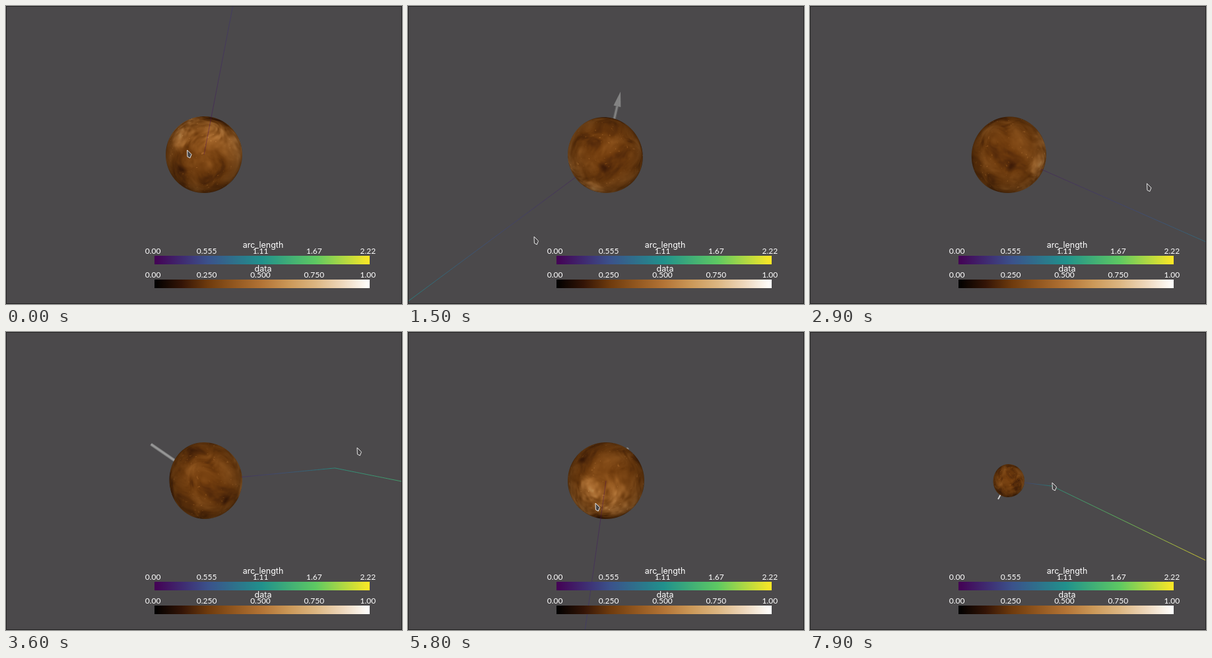
An HTML page with a canvas for the animation above (8000 ms loop, 600x451 px).

```html
<!DOCTYPE html>
<html lang="en">
<head>
<meta charset="utf-8">
<title>Rotating planet</title>
<style>
  html, body { margin: 0; width: 100%; height: 100%; overflow: hidden; background: #4b494b; }
  canvas, svg { position: absolute; left: 0; top: 0; display: block; }
  text { fill: #fff; text-anchor: middle; font: 12px Lato, "Open Sans", sans-serif; }
  .title { font: 12.5px Inter, Roboto, sans-serif; }
</style>
</head>
<body>
<canvas id="scene" width="600" height="451"></canvas>
<svg id="overlay" width="600" height="451" viewBox="0 0 600 451">
  <defs></defs>
  <g id="bars"></g>
  <rect x=".5" y=".5" width="599" height="450" fill="none" stroke="#222122"/>
  <path id="cursor" d="M0 0L6.5 6.5L4.3 12L.4 10Z" fill="#474547" stroke="#e8e8e8"/>
</svg>
<script>
const LOOP = 8000, STEP = 100, CX = 300, CY = 225;
const FOCAL = 841, NEAR = 14.5, FAR = 33.6;
const KINK_DISTANCE = 12, KINK_ARC = 1.2, TOTAL_ARC = 2.22;

// Drag stops: time, pointer x and y, line heading and tilt toward the viewer in degrees
const stops = [
  [0, 274.5, 218, -79, 14],
  [1500, 191, 349, -216.5, -33],
  [2200, 417, 350, -307, 0],
  [3600, 532, 175, -365.5, -60.5],
  [4500, 317, 79, -432, 0],
  [5800, 284, 259, -622, 14],
  [6300, 410, 300, -662, 5],
  [7900, 367, 228, -353, -72.5]
];
// Arrow parts that swing past the limb, with their reach in planet radii
const shafts = [
  { time: 1500, angle: -77, reach: 1.69, pointed: true },
  { time: 3600, angle: 214.5, reach: 1.68 },
  { time: 4500, angle: 46.5, reach: 1.38, pointed: true },
  { time: 5800, angle: -56, reach: 1.03 },
  { time: 7900, angle: 118, reach: 1.27 }
];
const viridis = ["#440154", "#3b528b", "#21918c", "#5ec962", "#fde725"];
const copper = ["#000000", "#331406", "#6f3b0d", "#935820", "#b37436", "#cb9858", "#dcb682", "#eed8bd", "#ffffff"];

const clamp = (x, lo = 0, hi = 1) => Math.min(hi, Math.max(lo, x));
const mix = (a, b, t) => a + (b - a) * t;
const mixAll = (a, b, t) => a.map((v, i) => mix(v, b[i], t));
const ease = t => t * t * (3 - 2 * t);
const radians = degrees => degrees * Math.PI / 180;
const dot = (a, b) => a[0] * b[0] + a[1] * b[1] + a[2] * b[2];
const cross = (a, b) => [
  a[1] * b[2] - a[2] * b[1], a[2] * b[0] - a[0] * b[2], a[0] * b[1] - a[1] * b[0]
];

// Smooth curve through the drag stops
function dragAt(time) {
  const i = Math.max(0, stops.findLastIndex((s, n) => s[0] <= time && n < stops.length - 1));
  const a = stops[i], b = stops[i + 1];
  const before = stops[Math.max(0, i - 1)], after = stops[Math.min(stops.length - 1, i + 2)];
  const span = b[0] - a[0], t = Math.min(1, (time - a[0]) / span);
  const [x, y, heading, tilt] = [1, 2, 3, 4].map(c => {
    if (c > 2) return mix(a[c], b[c], t);
    const m0 = (b[c] - before[c]) / (b[0] - before[0]) * span;
    const m1 = (after[c] - a[c]) / (after[0] - a[0]) * span;
    return mix(a[c], b[c], ease(t)) + t * (1 - t) * (m0 * (1 - t) - m1 * t);
  });
  return { x, y, heading: radians(heading), tilt: radians(tilt) };
}

function lineDirection({ heading, tilt }) {
  return [Math.cos(heading) * Math.cos(tilt), Math.sin(heading) * Math.cos(tilt), Math.sin(tilt)];
}

// The planet turns with the line: carry its frame along without extra roll.
const poses = [];
let side = [.2, .1, 1];
for (let time = 0; time < LOOP; time += STEP) {
  const axis = lineDirection(dragAt(time)), lean = dot(side, axis);
  side = side.map((v, i) => v - axis[i] * lean);
  const length = Math.hypot(...side);
  side = side.map(v => v / length);
  poses.push([side, cross(axis, side), axis]);
}

const parseRamp = ramp => ramp.map(hex => [1, 3, 5].map(i => parseInt(hex.slice(i, i + 2), 16)));
const viridisRgb = parseRamp(viridis), copperRgb = parseRamp(copper);

function rampColor(ramp, value) {
  const x = clamp(value) * (ramp.length - 1), i = Math.min(ramp.length - 2, Math.floor(x));
  return mixAll(ramp[i], ramp[i + 1], x - i);
}

// Smooth value noise
function hash(x, y, z) {
  let h = Math.imul(x, 374761393) ^ Math.imul(y, 668265263) ^ Math.imul(z, 1442695041);
  h = Math.imul(h ^ (h >>> 13), 1274126177);
  return ((h ^ (h >>> 16)) >>> 0) / 4294967295;
}
function noise(x, y, z) {
  const i = Math.floor(x), j = Math.floor(y), k = Math.floor(z);
  const u = ease(x - i), v = ease(y - j), w = ease(z - k);
  const row = (b, c) => mix(hash(i, b, c), hash(i + 1, b, c), u);
  const plane = c => mix(row(j, c), row(j + 1, c), v);
  return mix(plane(k), plane(k + 1), w);
}
function fbm(x, y, z) {
  let sum = 0, amp = .53;
  for (let octave = 0; octave < 4; octave++, amp /= 2) {
    sum += amp * noise(x, y, z);
    x = x * 2.03 + 5; y = y * 2.03 + 9; z = z * 2.03 + 2;
  }
  return sum;
}
// Brighter, mottled terrain lies on the side the line leaves from.
function surface(x, y, z) {
  const bend = noise(x * 2 + 7, y * 2, z * 2) * 1.5;
  const streaks = fbm(x * 2.4 + bend, y * 2.4 + bend, z * 1.7);
  const bright = ease(clamp((z + .35) / 1.1)) * clamp(noise(x * 2 + 20, y * 2, z * 2) * 2 - .2);
  const grain = noise(x * 10, y * 10 + bend * 4, z * 6);
  const speck = Math.max(0, noise(x * 15 + 40, y * 15, z * 15) - .86);
  return .26 + (streaks - .5) * .36 + bright * (.06 + grain * .2) + speck;
}

const ctx = document.getElementById("scene").getContext("2d");
const SIZE = 124, HALF = SIZE / 2;
const ball = document.createElement("canvas");
ball.width = ball.height = SIZE;
const ballCtx = ball.getContext("2d");

function drawPlanet(axes, radius) {
  const image = ballCtx.createImageData(SIZE, SIZE);
  // The far side flattens as the line points away from the viewer.
  const [lx, ly, lz] = axes[2], lateral = Math.hypot(lx, ly) || 1;
  const squash = Math.max(0, -lz) * .11, ux = -lx / lateral, uy = -ly / lateral;
  for (let row = 0; row < SIZE; row++) for (let col = 0; col < SIZE; col++) {
    let x = (col + .5 - HALF) / radius, y = (row + .5 - HALF) / radius;
    const extra = Math.max(0, x * ux + y * uy) * squash / (1 - squash);
    x += ux * extra;
    y += uy * extra;
    const r = Math.hypot(x, y), alpha = clamp((1 - r) * radius + .5);
    if (!alpha) continue;
    const normal = [x, y, Math.sqrt(Math.max(0, 1 - r * r))];
    const rgb = rampColor(copperRgb, surface(...axes.map(a => dot(a, normal))));
    const shade = .6 + .42 * normal[2] - .05 * y;
    const at = (row * SIZE + col) * 4;
    for (let c = 0; c < 3; c++) image.data[at + c] = rgb[c] * shade;
    image.data[at + 3] = alpha * 255;
  }
  ballCtx.putImageData(image, 0, 0);
  ctx.drawImage(ball, CX - HALF, CY - HALF);
}

function stroke(from, to, width, color) {
  ctx.strokeStyle = color;
  ctx.lineWidth = width;
  ctx.beginPath();
  ctx.moveTo(CX + from[0], CY + from[1]);
  ctx.lineTo(CX + to[0], CY + to[1]);
  ctx.stroke();
}

const gray = value => `rgb(${value},${value},${value})`;

function drawShaft({ time, angle, reach, pointed }, now, radius) {
  const away = (now - time) / 650;
  const length = radius * (1 + (reach - 1) * (1 - away * away));
  if (length <= radius) return;
  const turned = radians(angle - away * 25), dx = Math.cos(turned), dy = Math.sin(turned);
  const light = Math.round(180 + 50 * dy), width = 4.6 * radius / 58;
  const head = pointed ? (length - radius) * .57 : 0, neck = length - head;
  const end = [dx * neck, dy * neck];
  stroke([0, 0], end, width, gray(light - 30));
  stroke([0, 0], end, width / 2, gray(light));
  if (!pointed) return;
  const half = head * .2 + 1;
  ctx.beginPath();
  ctx.moveTo(CX + dx * length, CY + dy * length);
  ctx.lineTo(CX + end[0] - dy * half, CY + end[1] + dx * half);
  ctx.lineTo(CX + end[0] + dy * half, CY + end[1] - dx * half);
  ctx.fillStyle = gray(light);
  ctx.fill();
}

function project([x, y, z], distance) {
  const scale = FOCAL / Math.max(.5, distance - z);
  return [x * scale, y * scale];
}

function drawArc(drag, distance, radius) {
  const start = [0, 0, clamp(drag.tilt / radians(14), -1, 1)];
  const bend = lineDirection(drag).map(v => v * KINK_DISTANCE);
  const onward = drag.heading + radians(20);
  const end = [bend[0] + 11 * Math.cos(onward), bend[1] + 11 * Math.sin(onward), bend[2] + 9];
  const legs = [[start, bend, 0, KINK_ARC], [bend, end, KINK_ARC, TOTAL_ARC]];
  const pieces = 120;
  for (const [a, b, arcA, arcB] of legs) for (let i = 0; i < pieces; i++) {
    const far = mixAll(a, b, (i + 1) / pieces);
    const from = project(mixAll(a, b, i / pieces), distance), to = project(far, distance);
    const r = Math.hypot(...to) / radius;
    if (r < 1 && far[2] < Math.sqrt(1 - r * r)) continue;
    const arc = mix(arcA, arcB, (i + .5) / pieces);
    ctx.globalAlpha = clamp(.45 + arc * .4, 0, .9);
    stroke(from, to, .9, `rgb(${rampColor(viridisRgb, arc / TOTAL_ARC).map(Math.round)})`);
  }
  ctx.globalAlpha = 1;
}

function buildBar(name, id, y, ramp, labels) {
  const colors = ramp.map((c, i) => `<stop offset="${i / (ramp.length - 1)}" stop-color="${c}"/>`).join("");
  document.querySelector("defs").innerHTML += `<linearGradient id="${id}">${colors}</linearGradient>`;
  const ticks = labels.map((s, i) => `<text x="${222.7 + i * 81.4}" y="${y - 3}">${s}</text>`).join("");
  document.getElementById("bars").innerHTML +=
    `<rect x="225" y="${y}" width="326" height="13" fill="url(#${id})"/>` +
    `<text class="title" x="389.5" y="${y - 12.5}">${name}</text>${ticks}`;
}
buildBar("arc_length", "arcRamp", 378, viridis, ["0.00", "0.555", "1.11", "1.67", "2.22"]);
buildBar("data", "dataRamp", 414, copper, ["0.00", "0.250", "0.500", "0.750", "1.00"]);

const cursor = document.getElementById("cursor");

function render(time) {
  const drag = dragAt(time);
  const distance = NEAR * (FAR / NEAR) ** ease(clamp((time - 6450) / 1150));
  const radius = FOCAL / distance;
  ctx.fillStyle = "#4b494b";
  ctx.fillRect(0, 0, 600, 451);
  for (const shaft of shafts) drawShaft(shaft, time, radius);
  drawPlanet(poses[time / STEP], radius);
  drawArc(drag, distance, radius);
  cursor.setAttribute("transform", `translate(${drag.x} ${drag.y})`);
}

const began = performance.now();
let shown = -1;
function tick() {
  const elapsed = Math.max(0, performance.now() - began) % LOOP;
  const time = Math.floor(elapsed / STEP) * STEP;
  if (time !== shown) render(shown = time);
  requestAnimationFrame(tick);
}
tick();
</script>
</body>
</html>
```
